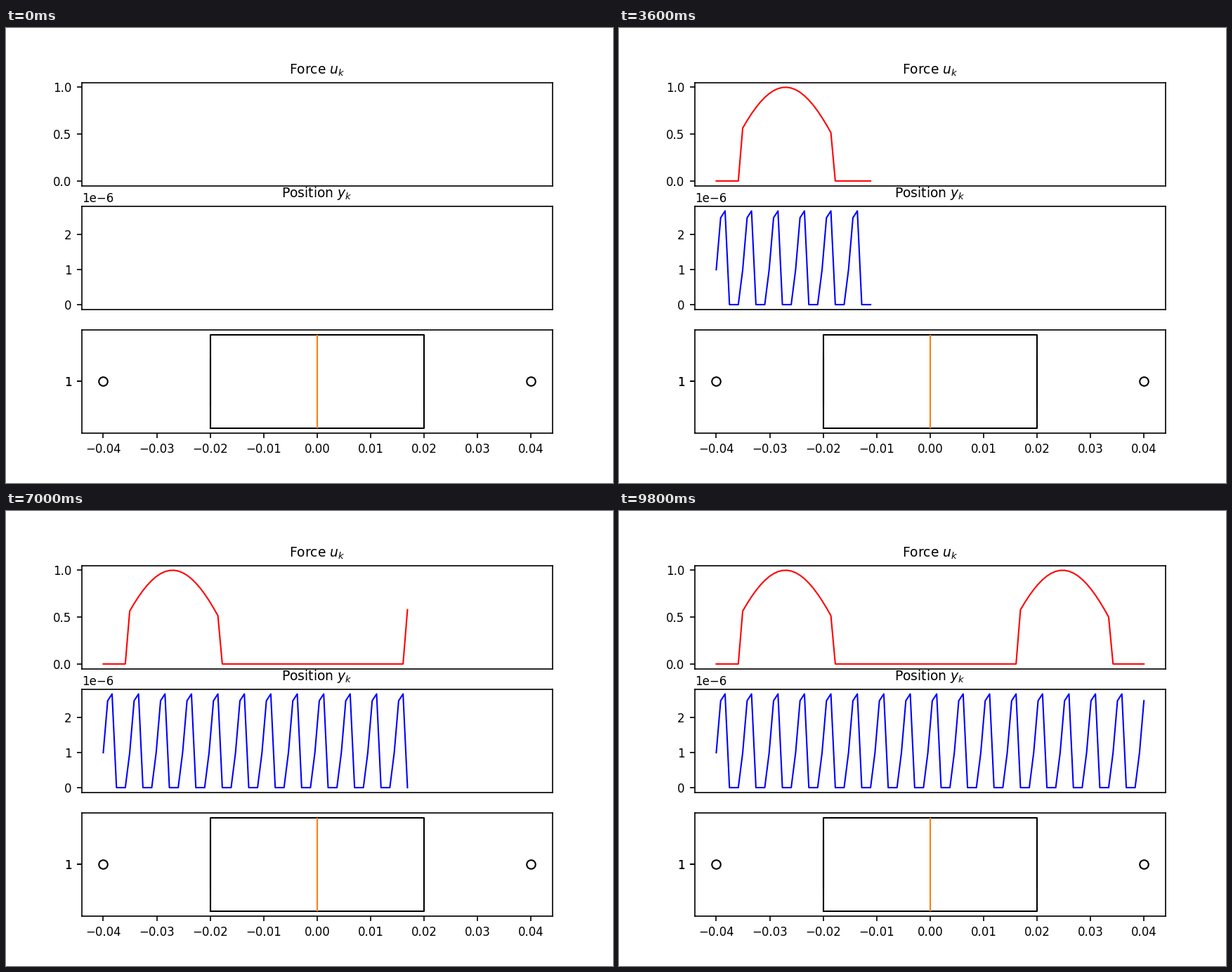
Animation of 864x648 px, one loop 10 s. Source, as a matplotlib script:

```python
import numpy as np
import matplotlib.pyplot as plt
from matplotlib.animation import FuncAnimation

plt.rcParams.update({
    "font.family": "DejaVu Sans",
    "axes.titlesize": 9,
    "xtick.labelsize": 8,
    "ytick.labelsize": 8,
    "lines.linewidth": 1.0,
})

N = 98
FRAMES = 50
STEP = 2  # samples added per frame

k = np.arange(N)
x = np.linspace(-0.04, 0.04, N)
wave = np.sin(0.1 * k)
force = np.where(wave > 0.5, wave, 0)
position = 1e-6 * np.resize([1, 2.485, 2.68, 0, 0, 0], N)

fig, (ax_u, ax_y, ax_box) = plt.subplots(3, figsize=(5.76, 4.32), dpi=150)


def trace(ax, data, color, title, ticks):
    top = data.max()
    ax.set(xlim=(-0.044, 0.044), ylim=(-0.05 * top, 1.05 * top),
           yticks=ticks)
    ax.set_title(title)
    ax.tick_params(bottom=False, labelbottom=False)
    return ax.plot([], [], color=color)[0]


line_u = trace(ax_u, force, "red", "Force $u_k$", [0, 0.5, 1])
line_y = trace(ax_y, position, "blue", "Position $y_k$", [0, 1e-6, 2e-6])

ax_box.boxplot([-0.04, 0, 0.04], vert=False, widths=1, whis=0)
ax_box.set(xlim=(-0.044, 0.044), ylim=(0.45, 1.55),
           xticks=np.linspace(-0.04, 0.04, 9))
ax_box.set_yticks([1, 1], ["1", "1"])


def update(frame):
    n = STEP * frame
    line_u.set_data(x[:n], force[:n])
    line_y.set_data(x[:n], position[:n])
    return line_u, line_y


anim = FuncAnimation(fig, update, frames=FRAMES, interval=200,
                     repeat=True, repeat_delay=0)
plt.show()
```
